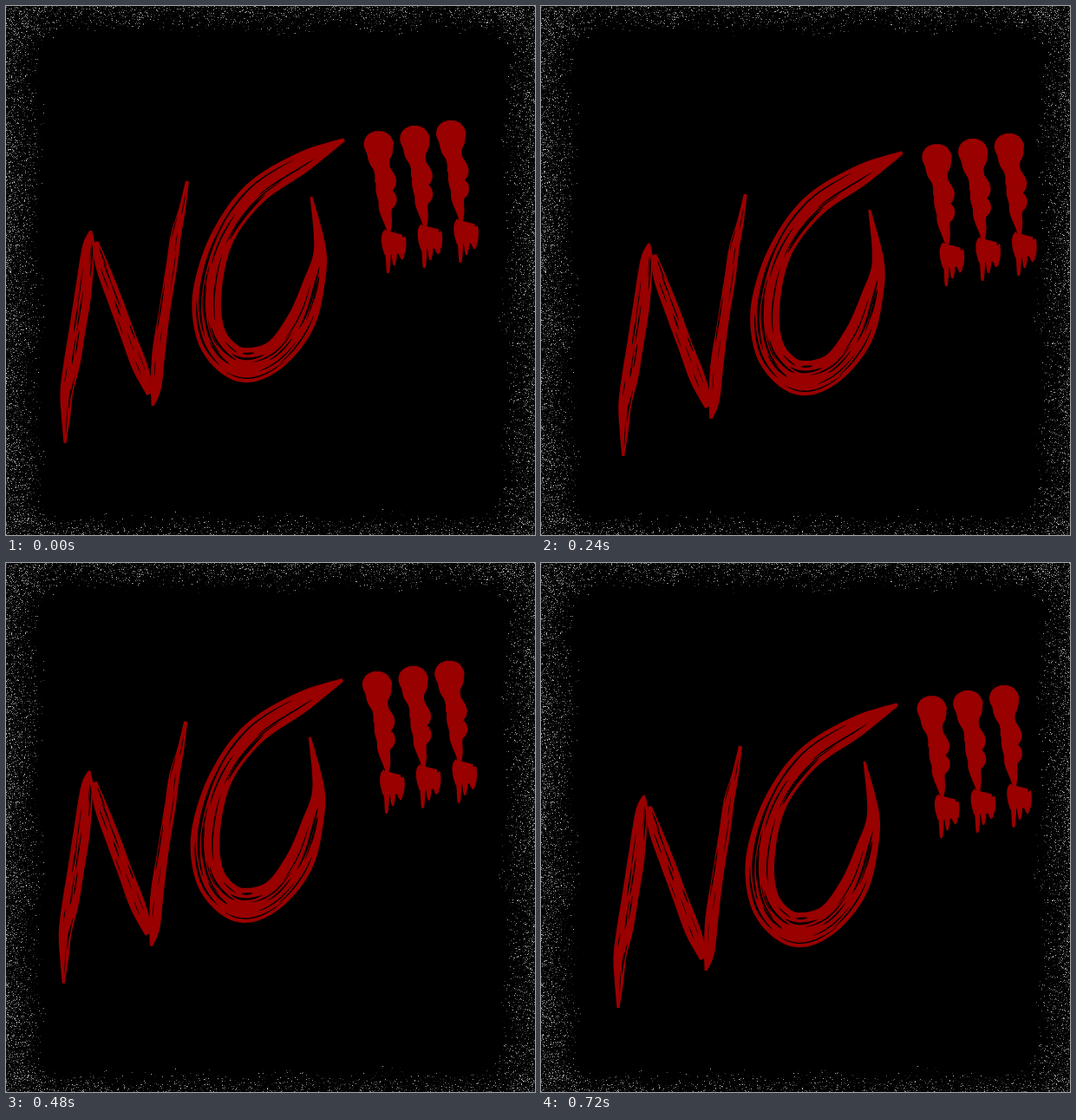
An HTML page with a canvas for the animation above (0.8 s loop, 610 by 610 pixels).

```html
<!DOCTYPE html>
<html lang="en">
<head>
<meta charset="utf-8">
<title>NO!!!</title>
<style>
  html, body { margin: 0; width: 100%; height: 100%; overflow: hidden; background: #000; }
  svg, canvas { position: absolute; left: 0; top: 0; width: 610px; height: 610px; display: block; }
</style>
</head>
<body>
<svg viewBox="0 0 610 610" role="img" aria-label="NO!!!"><g id="word"></g></svg>
<canvas id="grain" width="610" height="610"></canvas>
<script>
const RED = '#990000', BLACK = '#000';
const word = document.getElementById('word');

function randomFrom(seed) {
  return () => {
    seed = (seed + 0x6D2B79F5) | 0;
    let t = Math.imul(seed ^ (seed >>> 15), 1 | seed);
    t ^= t + Math.imul(t ^ (t >>> 7), 61 | t);
    return ((t ^ (t >>> 14)) >>> 0) / 4294967296;
  };
}

function add(d, color, move) {
  const el = document.createElementNS('http://www.w3.org/2000/svg', 'path');
  el.setAttribute('d', d);
  el.setAttribute('fill', color);
  if (move) el.setAttribute('transform', move);
  word.appendChild(el);
}

// Smooth path through [x, y, width] keys, read at u = 0..1
function spine(keys) {
  const last = keys.length - 1;
  const key = i => keys[Math.max(0, Math.min(last, i))];
  return u => {
    const i = Math.max(0, Math.min(last - 1, Math.floor(u * last)));
    const f = u * last - i;
    const [a, b, c, d] = [key(i - 1), key(i), key(i + 1), key(i + 2)];
    return b.map((p, k) => p + f / 2 * (c[k] - a[k] + f * (2 * a[k] - 5 * p + 4 * c[k] - d[k]
      + f * (3 * (p - c[k]) + d[k] - a[k]))));
  };
}

// Ribbon along part of a spine; side is the place across its width, -0.5..0.5
function ribbon(path, from, to, side, width) {
  const left = [], right = [], n = Math.ceil(12 + 90 * (to - from));
  for (let i = 0; i <= n; i++) {
    const u = from + (to - from) * i / n;
    const [x, y, w] = path(u);
    const p = path(Math.max(0, u - 0.004)), q = path(Math.min(1, u + 0.004));
    const len = Math.hypot(q[0] - p[0], q[1] - p[1]) || 1;
    const nx = (p[1] - q[1]) / len, ny = (q[0] - p[0]) / len;
    const half = width(i / n, w) / 2, mid = side * w;
    const edge = s => [(x + nx * (mid + s)).toFixed(1), (y + ny * (mid + s)).toFixed(1)];
    left.push(edge(half));
    right.unshift(edge(-half));
  }
  return 'M' + left.concat(right).join('L') + 'Z';
}

const full = path => ribbon(path, 0, 1, 0, (f, w) => w);
const taper = size => f => size * Math.sin(Math.PI * f) ** 0.6;

// A dry stroke: solid body with bare streaks running along it
function brush(keys, streaks, size, seed) {
  const path = spine(keys), rnd = randomFrom(seed);
  add(full(path), RED);
  for (let i = 0; i < streaks; i++) {
    const from = 0.05 + 0.75 * (i + rnd()) / streaks;
    const to = Math.min(0.95, from + 0.06 + 0.1 * rnd());
    add(ribbon(path, from, to, (rnd() - 0.5) * 0.8, taper(size * (0.5 + rnd()))), BLACK);
  }
  return path;
}

// A single hair of the brush
function hair(keys, size, color = RED) {
  add(ribbon(spine(keys), 0, 1, 0, taper(size)), color);
}

// N
brush([[98, 259, 3], [95, 278, 14], [89, 330, 19], [82, 375, 19], [76, 412, 19],
  [70, 445, 15], [69, 475, 10], [68, 504, 3]], 12, 1.2, 4);
brush([[103, 272, 7], [111, 300, 15], [126, 340, 17], [140, 378, 17],
  [154, 415, 18], [167, 447, 10]], 10, 1.2, 9);
brush([[209, 202, 4], [203, 235, 8], [196, 264, 12], [191, 300, 13], [183, 350, 13],
  [176, 400, 15], [173, 440, 12], [169, 461, 3]], 7, 1.1, 15);
hair([[65, 425], [58, 455], [53, 484]], 4);
hair([[112, 279], [138, 340], [165, 410]], 2);
hair([[216, 212], [210, 238], [203, 268]], 4);
hair([[192, 235], [187, 262], [182, 292]], 3);
hair([[198, 327], [194, 348], [189, 370]], 2.4);
hair([[207, 290], [206, 295], [205, 300]], 3);

// O
const ring = brush([[390, 154, 4], [342, 180, 24], [287, 216, 28], [249, 268, 27],
  [232, 330, 33], [236, 378, 34], [256, 406, 37], [281, 414, 40], [313, 400, 33],
  [340, 364, 33], [355, 320, 25], [362, 280, 14], [352, 220, 3]], 26, 2, 21);
add(ribbon(ring, 0.25, 0.42, 0.22, taper(3)), BLACK);
hair([[288, 236], [263, 280], [251, 335]], 3);
hair([[395, 161], [372, 169], [346, 184]], 4);
hair([[368, 163], [347, 173], [329, 182]], 3, BLACK);
hair([[338, 258], [347, 290], [345, 330]], 6);
hair([[343, 257], [352, 285], [350, 325]], 5);

// Three dripping exclamation marks
const drip = full(spine([[513, 132, 8], [513, 136, 24], [513, 145, 34], [514, 155, 31],
  [514, 165, 25], [517, 176, 19], [521, 190, 25], [519, 201, 18], [523, 211, 22],
  [521, 222, 15], [524, 238, 9], [525, 248, 4]]));
const foot = full(spine([[531, 249, 20], [530, 253, 27], [531, 263, 28], [532, 274, 24]]));
const tails = [[524, 296], [531, 287], [540, 280]].map(([x, end]) =>
  full(spine([[x - 2, 264, 7], [x, 276, 6], [x, end - 4, 4], [x, end, 2]])));
for (let i = 0; i < 3; i++) {
  const move = `translate(${-41.7 * i} ${6.1 * i})`;
  for (const part of [drip, foot, ...tails]) add(part, RED, move);
}

// Speckled frame: density grows with distance from a rounded opening
function drawGrain() {
  const rnd = randomFrom(7123), size = 610, radius = 30;
  const ctx = document.getElementById('grain').getContext('2d');
  const img = ctx.createImageData(size, size);
  for (let y = 0; y < size; y++) {
    for (let x = 0; x < size; x++) {
      const wave = 3 * Math.sin(x / 17 + y / 29) + 2 * Math.sin(y / 11 - x / 23);
      const dx = Math.max(44 + radius - x, x - 570 + radius, 0);
      const dy = Math.max(33 + radius - y, y - 583 + radius, 0);
      const depth = Math.hypot(dx, dy) - radius + wave;
      if (depth <= 0 || rnd() > 0.45 * Math.min(1, depth / 40) ** 1.25) continue;
      const i = (y * size + x) * 4;
      img.data.fill(255, i, i + 3);
      img.data[i + 3] = 10 + 190 * rnd() ** 3.5;
    }
  }
  ctx.putImageData(img, 0, 0);
}
drawGrain();

// Shake: time, x, y
const LOOP = 800, STEP = 40;
const shake = [
  [0, 0, 0], [160, 34.5, 0], [320, 19, 30], [400, -17, -5.5],
  [560, 13.5, -33], [640, -21, -33], [720, 21, 9]
];

function render(ms) {
  const t = Math.min(Math.floor((ms % LOOP) / STEP) * STEP, 720);
  const i = Math.max(1, shake.findIndex(k => k[0] >= t));
  const [t0, x0, y0] = shake[i - 1], [t1, x1, y1] = shake[i];
  const f = (t - t0) / (t1 - t0);
  word.setAttribute('transform', `translate(${x0 + (x1 - x0) * f} ${y0 + (y1 - y0) * f})`);
}

let start = null;
function tick(now) {
  if (start === null) start = now;
  render(now - start);
  requestAnimationFrame(tick);
}
render(0);
requestAnimationFrame(tick);
</script>
</body>
</html>
```
